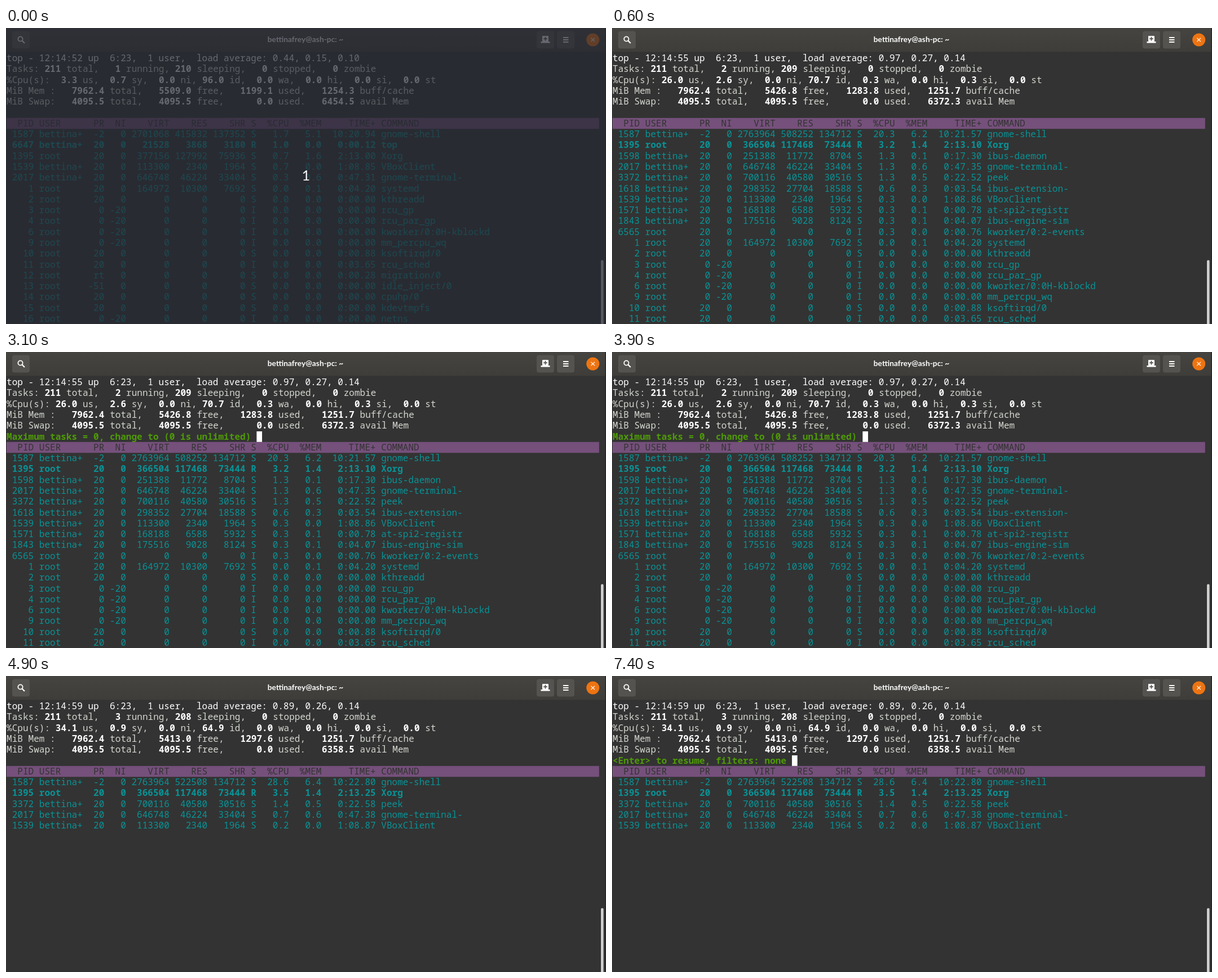
An HTML page with a canvas for the animation above (8 s loop, 1064 by 526 pixels).

```html
<!DOCTYPE html>
<html lang="en">
<head>
<meta charset="utf-8">
<title>Terminal</title>
<style>
  html, body { margin: 0; width: 100%; height: 100%; overflow: hidden; background: #333; }
  canvas { display: block; }
</style>
</head>
<body>
<canvas id="stage" width="1064" height="526"></canvas>
<script>
const ctx = document.getElementById('stage').getContext('2d');
const W = 1064, H = 526, LOOP = 8000;
const CELL_W = 9.64, CELL_H = 19.28, LEFT = 1, TOP = 44.2;
const SIZE = CELL_W / 0.6;
const MONO = '"Noto Sans Mono", monospace';
const SANS = 'Lato, sans-serif';
const C = { bg: '#333333', plain: '#d3d7cf', white: '#ffffff', teal: '#089396',
            purple: '#75507b', green: '#4e9a06', button: '#55534f' };

const ME = 'bettina+';
const TITLE = 'bettinafrey@ash-pc: ~';
// Column widths; negative means left-aligned.
const WIDTHS = [5, -8, 3, 3, 7, 6, 6, 1, 5, 5, 9, -1];
const HEADER = 'PID USER PR NI VIRT RES SHR S %CPU %MEM TIME+ COMMAND';

const SYSTEMD = '1 root 20 0 164972 10300 7692 S 0.0 0.1 0:04.20 systemd';
const kernel = (pid, pr, ni, state, name, time = '0:00.00', cpu = '0.0') =>
  `${pid} root ${pr} ${ni} 0 0 0 ${state} ${cpu} 0.0 ${time} ${name}`;
const KERNEL = [
  kernel(2, 20, 0, 'S', 'kthreadd'),
  kernel(3, 0, -20, 'I', 'rcu_gp'),
  kernel(4, 0, -20, 'I', 'rcu_par_gp'),
  kernel(6, 0, -20, 'I', 'kworker/0:0H-kblockd'),
  kernel(9, 0, -20, 'I', 'mm_percpu_wq'),
  kernel(10, 20, 0, 'S', 'ksoftirqd/0', '0:00.88'),
  kernel(11, 20, 0, 'I', 'rcu_sched', '0:03.65'),
  kernel(12, 'rt', 0, 'S', 'migration/0', '0:00.28'),
  kernel(13, -51, 0, 'S', 'idle_inject/0'),
  kernel(14, 20, 0, 'S', 'cpuhp/0'),
  kernel(15, 20, 0, 'S', 'kdevtmpfs'),
  kernel(16, 0, -20, 'I', 'netns')
];

const SCREENS = [
  {
    summary: [
      'top - 12:14:52 up  6:23,  1 user,  load average: 0.44, 0.15, 0.10',
      'Tasks: 211 total,   1 running, 210 sleeping,   0 stopped,   0 zombie',
      '%Cpu(s):  3.3 us,  0.7 sy,  0.0 ni, 96.0 id,  0.0 wa,  0.0 hi,  0.0 si,  0.0 st',
      'MiB Mem :   7962.4 total,   5509.0 free,   1199.1 used,   1254.3 buff/cache',
      'MiB Swap:   4095.5 total,   4095.5 free,      0.0 used.   6454.5 avail Mem'
    ],
    rows: [
      `1587 ${ME} -2 0 2701068 415832 137352 S 1.7 5.1 10:20.94 gnome-shell`,
      `6647 ${ME} 20 0 21528 3868 3180 R 1.0 0.0 0:00.12 top`,
      '1395 root 20 0 377156 127992 75936 S 0.7 1.6 2:13.00 Xorg',
      `1539 ${ME} 20 0 113300 2340 1964 S 0.7 0.0 1:08.85 VBoxClient`,
      `2017 ${ME} 20 0 646748 46224 33404 S 0.3 0.6 0:47.31 gnome-terminal-`,
      SYSTEMD, ...KERNEL
    ]
  },
  {
    summary: [
      'top - 12:14:55 up  6:23,  1 user,  load average: 0.97, 0.27, 0.14',
      'Tasks: 211 total,   2 running, 209 sleeping,   0 stopped,   0 zombie',
      '%Cpu(s): 26.0 us,  2.6 sy,  0.0 ni, 70.7 id,  0.3 wa,  0.0 hi,  0.3 si,  0.0 st',
      'MiB Mem :   7962.4 total,   5426.8 free,   1283.8 used,   1251.7 buff/cache',
      'MiB Swap:   4095.5 total,   4095.5 free,      0.0 used.   6372.3 avail Mem'
    ],
    rows: [
      `1587 ${ME} -2 0 2763964 508252 134712 S 20.3 6.2 10:21.57 gnome-shell`,
      '1395 root 20 0 366504 117468 73444 R 3.2 1.4 2:13.10 Xorg',
      `1598 ${ME} 20 0 251388 11772 8704 S 1.3 0.1 0:17.30 ibus-daemon`,
      `2017 ${ME} 20 0 646748 46224 33404 S 1.3 0.6 0:47.35 gnome-terminal-`,
      `3372 ${ME} 20 0 700116 40580 30516 S 1.3 0.5 0:22.52 peek`,
      `1618 ${ME} 20 0 298352 27704 18588 S 0.6 0.3 0:03.54 ibus-extension-`,
      `1539 ${ME} 20 0 113300 2340 1964 S 0.3 0.0 1:08.86 VBoxClient`,
      `1571 ${ME} 20 0 168188 6588 5932 S 0.3 0.1 0:00.78 at-spi2-registr`,
      `1843 ${ME} 20 0 175516 9028 8124 S 0.3 0.1 0:04.07 ibus-engine-sim`,
      kernel(6565, 20, 0, 'I', 'kworker/0:2-events', '0:00.76', '0.3'),
      SYSTEMD, ...KERNEL.slice(0, 7)
    ]
  },
  {
    summary: [
      'top - 12:14:59 up  6:23,  1 user,  load average: 0.89, 0.26, 0.14',
      'Tasks: 211 total,   3 running, 208 sleeping,   0 stopped,   0 zombie',
      '%Cpu(s): 34.1 us,  0.9 sy,  0.0 ni, 64.9 id,  0.0 wa,  0.0 hi,  0.0 si,  0.0 st',
      'MiB Mem :   7962.4 total,   5413.0 free,   1297.6 used,   1251.7 buff/cache',
      'MiB Swap:   4095.5 total,   4095.5 free,      0.0 used.   6358.5 avail Mem'
    ],
    rows: [
      `1587 ${ME} -2 0 2763964 522508 134712 S 28.6 6.4 10:22.80 gnome-shell`,
      '1395 root 20 0 366504 117468 73444 R 3.5 1.4 2:13.25 Xorg',
      `3372 ${ME} 20 0 700116 40580 30516 S 1.4 0.5 0:22.58 peek`,
      `2017 ${ME} 20 0 646748 46224 33404 S 0.7 0.6 0:47.38 gnome-terminal-`,
      `1539 ${ME} 20 0 113300 2340 1964 S 0.2 0.0 1:08.87 VBoxClient`
    ]
  }
];

const LIMIT_PROMPT = 'Maximum tasks = 0, change to (0 is unlimited) ';
const FILTER_PROMPT = '<Enter> to resume, filters: none ';
const PROMPT_ROW = 5, HEADER_ROW = 6;

const between = (t, a, b) => t >= a && t < b;
const colX = col => LEFT + col * CELL_W;
const rowY = row => TOP + row * CELL_H;

function rect(x, y, w, h, color) {
  ctx.fillStyle = color;
  ctx.fillRect(x, y, w, h);
}

function rounded(x, y, w, h, r, color) {
  ctx.fillStyle = color;
  ctx.beginPath();
  ctx.roundRect(x, y, w, h, r);
  ctx.fill();
}

function stroke(color, width, ...lines) {
  ctx.strokeStyle = color;
  ctx.lineWidth = width;
  ctx.beginPath();
  for (const [x1, y1, x2, y2] of lines) {
    ctx.moveTo(x1, y1);
    ctx.lineTo(x2, y2);
  }
  ctx.stroke();
}

function disc(x, y, r, color) {
  ctx.fillStyle = color;
  ctx.beginPath();
  ctx.arc(x, y, r, 0, 2 * Math.PI);
  ctx.fill();
}

function centered(text, x, y, font, color) {
  ctx.font = font;
  ctx.fillStyle = color;
  ctx.textAlign = 'center';
  ctx.fillText(text, x, y);
}

function print(text, col, row, color, bold = false) {
  ctx.font = `${bold ? 700 : 400} ${SIZE}px ${MONO}`;
  ctx.fillStyle = color;
  ctx.textAlign = 'left';
  ctx.fillText(text, colX(col), rowY(row) + 15);
}

function formatRow(line) {
  return line.split(' ').map((field, i) => {
    const w = WIDTHS[i];
    return w < 0 ? field.padEnd(-w) : field.padStart(w);
  }).join(' ');
}

function titleBar() {
  const shade = ctx.createLinearGradient(0, 0, 0, 43);
  shade.addColorStop(0, '#454440');
  shade.addColorStop(1, '#3e3d39');
  rect(0, 0, W, 43, shade);
  rect(0, 42, W, 1, '#383733');
  centered(TITLE, 531, 25, `700 13.8px ${SANS}`, C.white);

  for (const x of [11, 941, 977]) rounded(x, 5.5, 31, 31, 4, C.button);

  // Magnifier
  ctx.strokeStyle = C.white;
  ctx.lineWidth = 1.8;
  ctx.beginPath();
  ctx.arc(25.5, 19.5, 4.1, 0, 2 * Math.PI);
  ctx.stroke();
  stroke(C.white, 2.2, [28.5, 22.5, 33, 27]);

  // New tab
  rounded(951, 14, 11, 10, 1, C.white);
  rect(948.5, 24, 16, 2.6, C.white);
  stroke(C.button, 1.8, [956.5, 15.8, 956.5, 22.4], [953.2, 19.1, 959.8, 19.1]);

  // Menu
  stroke(C.white, 1.9, [988, 17, 997.5, 17], [988, 21, 997.5, 21], [988, 25, 997.5, 25]);

  // Close
  disc(1040.7, 21, 11.5, '#ee7412');
  stroke('#fde3cd', 1.6, [1037.4, 17.7, 1044, 24.3], [1044, 17.7, 1037.4, 24.3]);
}

function summary(lines) {
  print(lines[0], 0, 0, C.white);
  lines.slice(1).forEach((line, i) => {
    let col = 0;
    for (const part of line.split(/(\d[\d.]*)/)) {
      const bold = /^\d/.test(part);
      print(part, col, i + 1, bold ? C.white : C.plain, bold);
      col += part.length;
    }
  });
}

function table(rows) {
  rect(LEFT, rowY(HEADER_ROW), 109 * CELL_W, CELL_H, C.purple);
  print(formatRow(HEADER), 0, HEADER_ROW, C.bg);
  rows.forEach((row, i) =>
    print(formatRow(row), 0, HEADER_ROW + 1 + i, C.teal, row.includes(' R ')));
}

function cursor(col) {
  rect(colX(col), 141, CELL_W, 18.8, C.white);
}

function prompt(t) {
  if (between(t, 2000, 4900)) {
    const end = LIMIT_PROMPT.length;
    print(LIMIT_PROMPT, 0, PROMPT_ROW, C.green, true);
    if (t >= 4000) print('5', end, PROMPT_ROW, C.white);
    if (between(t, 2000, 2500) || between(t, 3100, 3700) || between(t, 3900, 4000)) cursor(end);
    if (between(t, 4000, 4500)) cursor(end + 1);
  } else if (t >= 6600) {
    print(FILTER_PROMPT, 0, PROMPT_ROW, C.green, true);
    if (!between(t, 6800, 7400)) cursor(FILTER_PROMPT.length);
  }
}

function countdown() {
  rect(0, 0, W, H, 'rgba(38, 41, 50, 0.7)');
  centered('1', 532, 271, `400 25.5px ${SANS}`, '#f4f4f5');
}

function draw(t) {
  const screen = SCREENS[t < 600 ? 0 : t < 4900 ? 1 : 2];
  rect(0, 0, W, H, C.bg);
  titleBar();
  summary(screen.summary);
  table(screen.rows);
  prompt(t);
  rounded(1055, 412.5, 4.6, 118, 2, '#d0d0ce');
  rect(1062.5, 0, 1.5, H, '#272725');
  if (t < 500) countdown();
}

const start = performance.now();
function tick() {
  draw((performance.now() - start) % LOOP);
  requestAnimationFrame(tick);
}
tick();
</script>
</body>
</html>
```
